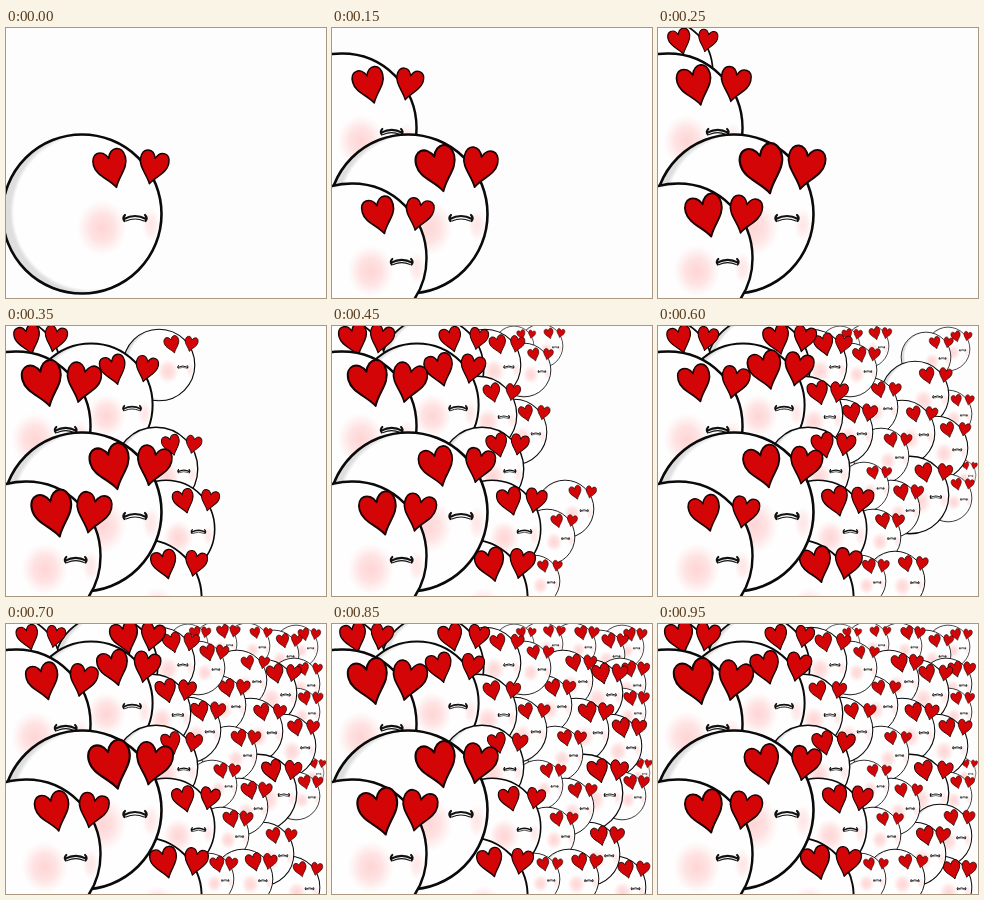
An HTML page without scripts for the animation above (1000 ms loop, 320x270 px).

```html
<!DOCTYPE html>
<html lang="en">
<head>
<meta charset="utf-8">
<title>Heart-eyed faces</title>
<style>
  @property --now { syntax: "<number>"; inherits: true; initial-value: 0; }

  html, body { margin: 0; height: 100%; overflow: hidden; background: #fdfdfd; }
  svg { display: block; width: 100vw; height: 100vh; }

  /* One tick is 50 ms; --t is the tick at which a face pops up. */
  .crowd { animation: clock 1s steps(20) infinite; }
  @keyframes clock { from { --now: 0; } to { --now: 20; } }

  .face {
    --t: 11;
    opacity: calc(var(--now) - var(--t) + 1);
    transform: translate(calc(var(--x) * 1px), calc(var(--y) * 1px)) scale(calc(var(--r) / 80));
  }
  .beat { transform: scale(calc(1.145 - .145 * cos((var(--now) - var(--t)) * 36deg))); }
</style>
</head>
<body>
<svg viewBox="0 0 320 270">
  <defs>
    <radialGradient id="skin" gradientUnits="userSpaceOnUse" cx="9" cy="-2" r="81">
      <stop offset=".95" stop-color="#fefefe"/>
      <stop offset="1" stop-color="#dedede"/>
    </radialGradient>
    <radialGradient id="blush">
      <stop offset="0" stop-color="#ffcaca" stop-opacity=".8"/>
      <stop offset=".5" stop-color="#ffd0d0" stop-opacity=".6"/>
      <stop offset="1" stop-color="#ffdcdc" stop-opacity="0"/>
    </radialGradient>
    <path id="heart" class="beat" fill="#d40507" stroke="#1c0202" stroke-width="1.700" stroke-linejoin="round"
      d="M0 21C-5 11-16.500 5-16.500-6C-16.500-19-4-20 0-9C4-20 16.500-19 16.500-6C16.500 5 5 11 0 21Z"/>
    <g id="face">
      <circle r="79.5" fill="url(#skin)" stroke="#0a0a0a" stroke-width="2.6"/>
      <ellipse cx="20" cy="14" rx="25" ry="28" fill="url(#blush)"/>
      <ellipse cx="69" cy="11" rx="9" ry="17" fill="url(#blush)" opacity=".6"/>
      <g transform="translate(53 4)" fill="none" stroke="#111" stroke-linecap="round">
        <path stroke-width="2.2" d="M-11 1Q0-5 11 1M-10-3Q-13 0-10.500 3M10-3Q13 0 10.500 3"/>
        <path stroke-width="1.200" d="M-9 3Q0-1 9 3"/>
      </g>
      <g transform="translate(29 -47) rotate(-15)"><use href="#heart"/></g>
      <g transform="translate(71.500 -48) rotate(13) scale(.87)"><use href="#heart"/></g>
    </g>
  </defs>

  <!-- Back to front -->
  <g class="crowd">
    <use href="#face" class="face" style="--x:290;--y:23;--r:22"/>
    <use href="#face" class="face" style="--x:268;--y:31;--r:25"/>
    <use href="#face" class="face" style="--x:241;--y:22;--r:23;--t:13"/>
    <use href="#face" class="face" style="--x:209;--y:20;--r:22;--t:9"/>
    <use href="#face" class="face" style="--x:182;--y:20;--r:20;--t:9"/>
    <use href="#face" class="face" style="--x:288;--y:60;--r:26;--t:13"/>
    <use href="#face" class="face" style="--x:290;--y:88;--r:24"/>
    <use href="#face" class="face" style="--x:302;--y:149;--r:16"/>
    <use href="#face" class="face" style="--x:257;--y:69;--r:34"/>
    <use href="#face" class="face" style="--x:231;--y:56;--r:30;--t:14"/>
    <use href="#face" class="face" style="--x:278;--y:122;--r:32;--t:12"/>
    <use href="#face" class="face" style="--x:290;--y:172;--r:24"/>
    <use href="#face" class="face" style="--x:244;--y:107;--r:33;--t:12"/>
    <use href="#face" class="face" style="--x:210;--y:81;--r:30;--t:10"/>
    <use href="#face" class="face" style="--x:192;--y:44;--r:27;--t:9"/>
    <use href="#face" class="face" style="--x:153;--y:39;--r:36;--t:7"/>
    <use href="#face" class="face" style="--x:252;--y:169;--r:39"/>
    <use href="#face" class="face" style="--x:223;--y:130;--r:28;--t:10"/>
    <use href="#face" class="face" style="--x:182;--y:106;--r:33;--t:8"/>
    <use href="#face" class="face" style="--x:282;--y:212;--r:32;--t:18"/>
    <use href="#face" class="face" style="--x:283;--y:263;--r:31;--t:14"/>
    <use href="#face" class="face" style="--x:256;--y:230;--r:32;--t:13"/>
    <use href="#face" class="face" style="--x:233;--y:183;--r:29;--t:9"/>
    <use href="#face" class="face" style="--x:206;--y:161;--r:25;--t:10"/>
    <use href="#face" class="face" style="--x:215;--y:211;--r:28;--t:9"/>
    <use href="#face" class="face" style="--x:237;--y:255;--r:30;--t:10"/>
    <use href="#face" class="face" style="--x:202;--y:255;--r:26;--t:9"/>
    <use href="#face" class="face" style="--x:100;--y:43;--r:52;--t:9"/>
    <use href="#face" class="face" style="--x:146;--y:89;--r:39;--t:8"/>
    <use href="#face" class="face" style="--x:3;--y:43;--r:52;--t:4"/>
    <use href="#face" class="face" style="--x:85;--y:79;--r:62;--t:7"/>
    <use href="#face" class="face" style="--x:150;--y:143;--r:42;--t:6"/>
    <use href="#face" class="face" style="--x:160;--y:203;--r:49;--t:6"/>
    <use href="#face" class="face" style="--x:137;--y:272;--r:59;--t:6"/>
    <use href="#face" class="face" style="--x:10;--y:100;--r:75;--t:3"/>
    <use href="#face" class="face" style="--x:76;--y:186;--r:80;--t:0"/>
    <use href="#face" class="face" style="--x:20;--y:230;--r:75;--t:2"/>
  </g>
</svg>
</body>
</html>
```
